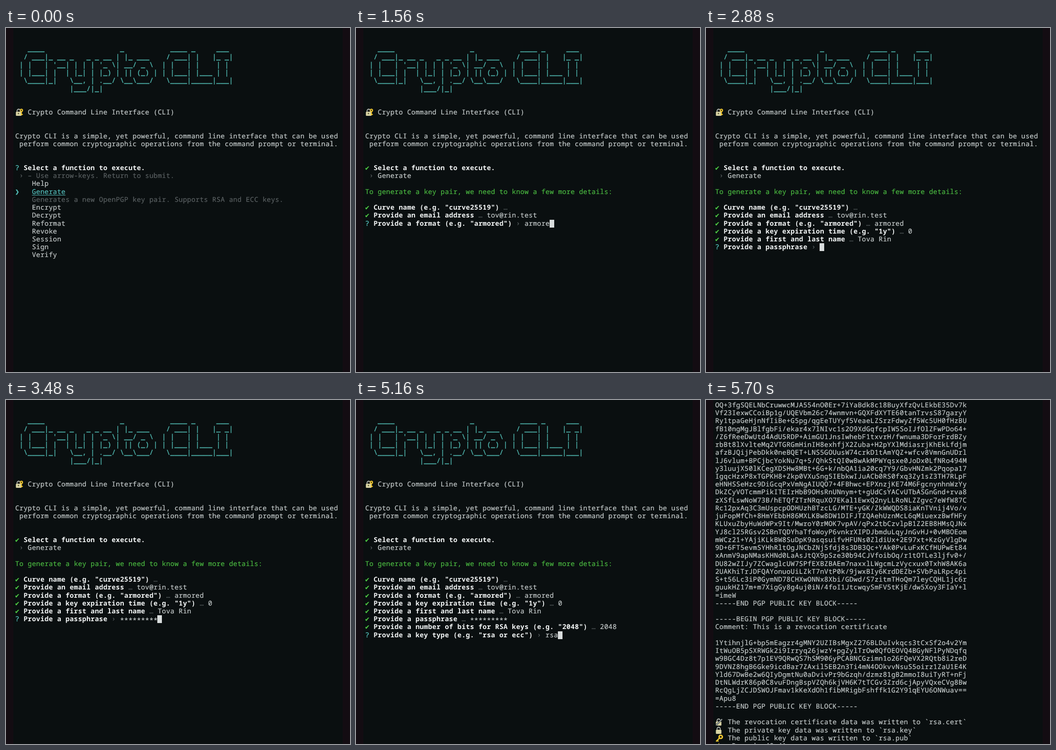
These frames come from a looping animation (748x748 px, 5760 ms). An HTML page:

```html
<!DOCTYPE html>
<html lang="en">
<head>
<meta charset="utf-8">
<title>Crypto CLI</title>
<style>
  html, body { margin: 0; width: 100%; height: 100%; overflow: hidden; background: #130c12; }
  #stage { position: absolute; left: 0; top: 0; width: 748px; height: 748px; overflow: hidden; }
  #panel { position: absolute; left: 16px; top: 0; width: 716px; height: 748px; background: #0a0f10; }
  #screen { position: absolute; inset: 0; }
  #screen span, #screen svg, #screen i { position: absolute; }
  #screen span {
    white-space: pre; color: #c8cece;
    font: 14.7px/17.25px "Noto Sans Mono", "DejaVu Sans Mono", monospace;
    letter-spacing: calc(9.117px - 1ch);
    text-rendering: geometricPrecision;
    -webkit-text-stroke: 0.2px currentColor;
  }
  #screen .bold { font-weight: 700; color: #f3f6f6; -webkit-text-stroke-width: 0; }
  #screen .teal { color: #55c0bb; -webkit-text-stroke-width: 0.4px; }
  #screen .art { color: #4fb5ad; -webkit-text-stroke-width: 0.5px; }
  #screen .link { color: #55c0bd; text-decoration: underline; text-underline-offset: 2px; }
  #screen .green { color: #4bba41; }
  #screen .tick { color: #4fc944; }
  #screen .dim { color: #5a6062; }
  #screen .stars { margin-top: 2.6px; }
  #screen i { width: 10px; height: 17px; margin-left: -0.6px; background: #d9dddd; }
</style>
</head>
<body>
<div id="stage"><div id="panel"></div><div id="screen"></div></div>
<script>
const LOOP = 5760, STEP = 60;
const LEFT = 20, TOP = 2.9, COL = 9.117, ROW = 17.235;
const screen = document.getElementById('screen');

const at = (row, col) => `left:${(LEFT + col * COL).toFixed(2)}px;top:${(TOP + row * ROW).toFixed(2)}px`;
const put = (row, col, text, kind = '') => `<span class="${kind}" style="${at(row, col)}">${text}</span>`;
const cursor = (row, col) => `<i style="${at(row, col)}"></i>`;

const lockShape = `<path d="M4 8V5a3.5 3.5 0 0 1 7 0v3" fill="none" stroke="#b9bdb8" stroke-width="1.8"/>
  <rect x="1.5" y="7" width="12" height="9" rx="1.5" fill="#d9d3a4"/>`;
const keyShape = `<g fill="none" stroke="#f0c62f"><circle cx="12" cy="5.5" r="3.6" stroke-width="3"/>
  <path d="M9.5 8L2 15.5M4.5 13l2.5 2.5" stroke-width="2.6"/></g>`;
const icons = {
  lock: lockShape,
  key: keyShape,
  lockKey: `${lockShape}<g fill="none" stroke="#f0c62f"><circle cx="13.5" cy="4" r="2.4" stroke-width="2.4"/>
    <path d="M13.5 6v9M13.5 13h3" stroke-width="2.2"/></g><circle cx="7" cy="11" r="1.4" fill="#57552f"/>`,
  lockPen: `${lockShape}<path d="M2 15L15 2" stroke="#30383a" stroke-width="3.4"/>
    <path d="M2 15L15 2" stroke="#c3c8c6" stroke-width="1.5"/>`,
  spark: `<path d="M8 1l1.6 5.4L15 8l-5.4 1.6L8 15 6.4 9.6 1 8l5.4-1.6z" fill="#f0c62f"/>`
};
const icon = (row, name) =>
  `<svg width="18" height="17" viewBox="0 0 18 17" style="${at(row, 0)}">${icons[name]}</svg>`;

const banner = String.raw`
   ____                  _           ____ _     ___
  / ___|_ __ _   _ _ __ | |_ ___    / ___| |   |_ _|
 | |   | '__| | | | '_ \| __/ _ \  | |   | |    | |
 | |___| |  | |_| | |_) | || (_) | | |___| |___ | |
  \____|_|   \__, | .__/ \__\___/   \____|_____|___|
             |___/|_|`.split('\n').slice(1);

const header = banner.map((line, i) => put(2 + i, 0, line, 'art')).join('') +
  icon(10, 'lockKey') +
  put(10, 3, 'Crypto Command Line Interface (CLI)') +
  put(13, 0, 'Crypto CLI is a simple, yet powerful, command line interface that can be used') +
  put(14, 0, ' perform common cryptographic operations from the command prompt or terminal.') +
  put(17, 2, 'Select a function to execute.', 'bold');

const menu = put(17, 0, '?', 'teal') +
  put(18, 1, '›', 'dim') + put(18, 3, '– Use arrow-keys. Return to submit.', 'dim') +
  put(19, 4, 'Help') +
  put(20, 0, '❯', 'teal') + put(20, 4, 'Generate', 'link') +
  put(21, 4, 'Generates a new OpenPGP key pair. Supports RSA and ECC keys.', 'dim') +
  ['Encrypt', 'Decrypt', 'Reformat', 'Revoke', 'Session', 'Sign', 'Verify']
    .map((name, i) => put(22 + i, 4, name)).join('');

const chosen = put(17, 0, '✔', 'tick') +
  put(18, 1, '›', 'dim') + put(18, 3, 'Generate') +
  put(20, 0, 'To generate a key pair, we need to know a few more details:', 'green');

// question, answer, asked at, typing from, ms per key, submitted at
const prompts = [
  ['Curve name (e.g. "curve25519")', '', 240, 0, 60, 540],
  ['Provide an email address', 'tov@rin.test', 540, 720, 30, 1140],
  ['Provide a format (e.g. "armored")', 'armored', 1140, 1260, 60, 1740],
  ['Provide a key expiration time (e.g. "1y")', '0', 1740, 2040, 60, 2280],
  ['Provide a first and last name', 'Tova Rin', 2280, 2400, 45, 2820],
  ['Provide a passphrase', '*********', 2820, 3000, 60, 3720],
  ['Provide a number of bits for RSA keys (e.g. "2048")', '2048', 3720, 4260, 60, 4680],
  ['Provide a key type (e.g. "rsa or ecc")', 'rsa', 4680, 4920, 60, 5220]
];

function prompt([question, answer, asked, from, pace, submitted], i, t) {
  if (t < asked) return '';
  const row = 22 + i, mark = question.length + 3, value = mark + 2;
  const done = t >= submitted;
  const keys = done ? answer.length
    : Math.max(0, Math.min(answer.length, Math.floor((t - from) / pace) + 1));
  return put(row, 0, done ? '✔' : '?', done ? 'tick' : 'teal') +
    put(row, 2, question, 'bold') +
    put(row, mark, done ? '…' : '›', 'dim') +
    put(row, value, answer.slice(0, keys), answer.startsWith('*') ? 'stars' : '') +
    (done ? '' : cursor(row, value + keys));
}

// Key material is invented from a seeded generator.
const letters = 'ABCDEFGHIJKLMNOPQRSTUVWXYZabcdefghijklmnopqrstuvwxyz0123456789+/';
let seed = 4711;
function rand() {
  seed = (Math.imul(seed, 1664525) + 1013904223) >>> 0;
  return seed / 4294967296;
}
const noise = n => Array.from({ length: n }, () => letters[Math.floor(rand() * 64)]).join('');
const lines = n => Array.from({ length: n }, () => noise(60));
const fence = (edge, type) => `-----${edge} PGP ${type} KEY BLOCK-----`;

const log = [
  fence('BEGIN', 'PRIVATE'), '', ...lines(58), '=' + noise(4), fence('END', 'PRIVATE'), '',
  fence('BEGIN', 'PUBLIC'), '', ...lines(28), '=imeW', fence('END', 'PUBLIC'), '',
  fence('BEGIN', 'PUBLIC'), 'Comment: This is a revocation certificate', '',
  ...lines(6), noise(58) + '==', '=Apu8', fence('END', 'PUBLIC'), ''
];
const ROWS = 44, FILES = 40;
const page = start => log.slice(start, start + ROWS).map((line, i) => put(i, 0, line)).join('');

const busy = page(log.length - FILES - ROWS);
const result = page(log.length - FILES) +
  [['lockPen', 'revocation certificate', 'cert'], ['lock', 'private key', 'key'], ['key', 'public key', 'pub']]
    .map(([name, what, ext], i) => icon(FILES + i, name) +
      put(FILES + i, 3, `The ${what} data was written to \`rsa.${ext}\``)).join('') +
  icon(43, 'spark') + put(43, 4, 'Done in 49.41s.');

function scene(t) {
  if (t >= 5280) return result;
  if (t >= 5220) return busy;
  if (t < 240) return header + menu;
  return header + chosen + prompts.map((p, i) => prompt(p, i, t)).join('');
}

let shown = -1;
const begin = performance.now();
function draw() {
  const t = Math.floor(((performance.now() - begin) % LOOP) / STEP) * STEP;
  if (t !== shown) {
    screen.innerHTML = scene(t);
    shown = t;
  }
  requestAnimationFrame(draw);
}
draw();
</script>
</body>
</html>
```
